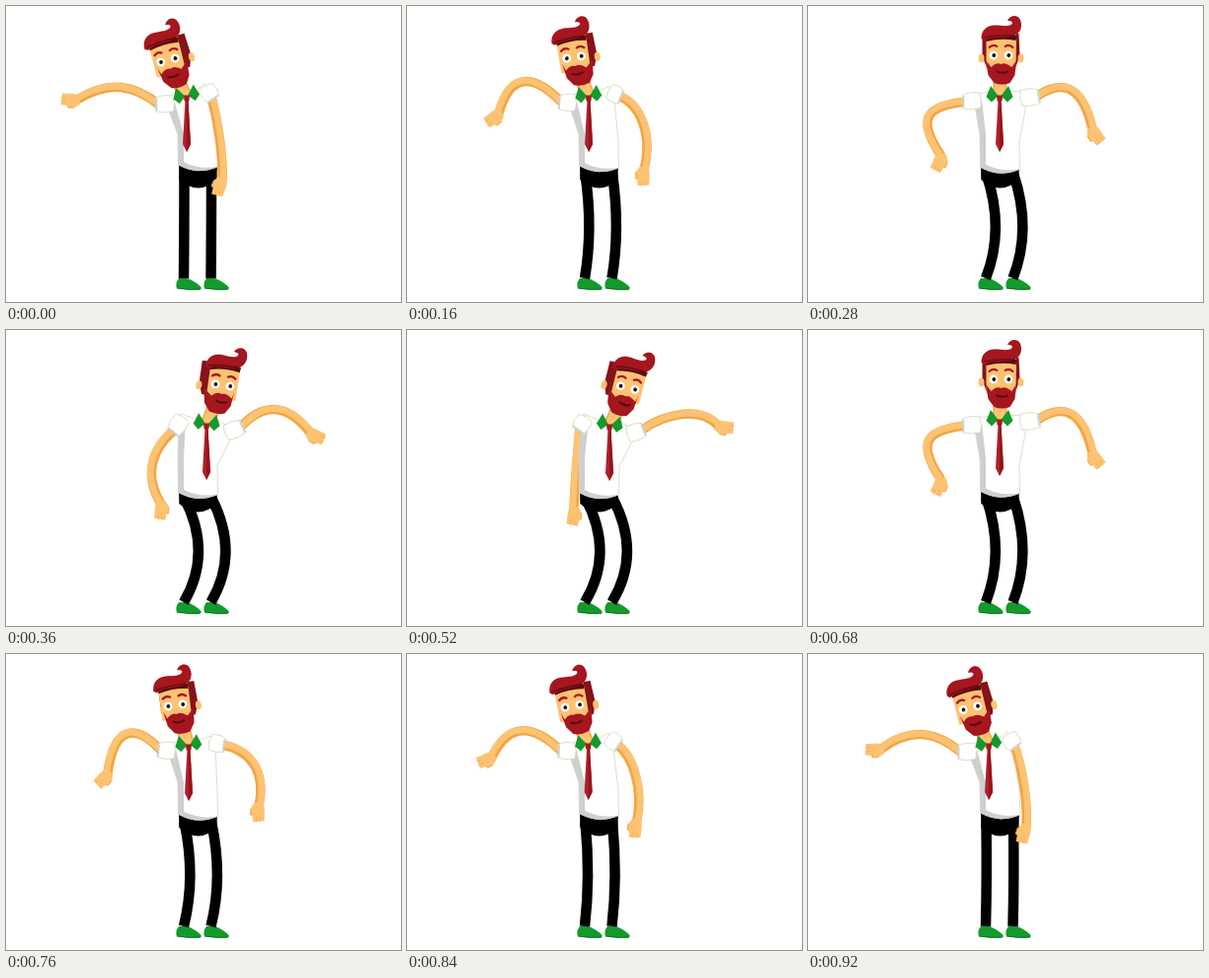
An HTML page for the animation above (960 ms loop, 400 by 300 pixels).

```html
<!DOCTYPE html>
<html lang="en">
<head>
<meta charset="utf-8">
<title>Dancing man</title>
<style>
html, body { margin: 0; width: 100%; height: 100%; overflow: hidden; background: #fff; }
svg { display: block; width: 100vw; height: 100vh; }
</style>
</head>
<body>
<svg id="stage" viewBox="0 0 400 300"></svg>
<script>
const LOOP = 960, HALF = LOOP / 2, STEP = 40;
const SKIN = '#fdc272', SHADE = '#f2a644', HAIR = '#a5161f', DARK = '#5c0a10';
const GREEN = '#149a2c', GREY = '#cfcfcf', EDGE = '#c6cba6';

// Poses of the swing from left to right; the way back mirrors them.
const keys = [0, 160, 200, 280, 360, 440, HALF];
const poses = {
  // x, y between the eyes, tilt, turn
  head: [[164, 55, -15, -1], [169, 52, -9, -.9], [171.5, 52, -8, -.8],
         [195.5, 50, 0, 0], [219.5, 56, 8, 1], [223.5, 58.5, 14, 1]],
  // tie knot x, y, knee bend
  body: [[183, 93, 0], [184, 93, 8], [185, 94, 12], [194, 93, 19], [203, 97, 29], [205, 98, 30]],
  // left shoulder, right shoulder
  shoulder: [[166, 99, 204, 85], [167, 98, 208, 88], [167, 98, 210, 90],
             [171, 96, 219, 93], [177, 92, 226, 103], [179, 92, 227, 105]],
  // cubic curve and hand angle
  armL: [[155, 100, 130, 80, 105, 75, 72, 95, 180], [157, 98, 130, 70, 105, 65, 93, 109, 140],
         [157, 98, 133, 72, 110, 70, 103, 121, 130], [160, 97, 122, 101, 108, 112, 135, 152, 110],
         [171, 101, 148, 120, 139, 147, 157, 176, 92], [175, 99, 173, 125, 170, 150, 169, 182, 94]],
  armR: [[208, 92, 214, 115, 220, 150, 219, 177, 112], [214, 91, 236, 99, 249, 130, 240, 166, 95],
         [218, 92, 244, 96, 264, 116, 256, 154, 93], [231, 92, 254, 76, 277, 76, 288, 125, 58],
         [237, 99, 257, 77, 281, 70, 308, 104, 30], [237, 102, 259, 86, 296, 76, 315, 97, 12]]
};
for (const rows of Object.values(poses)) {
  const [a, b] = rows.slice(-2);
  rows.push(b.map((v, i) => v + (v - a[i]) * .12));
}

function sample(rows, t) {
  let i = 0;
  while (i < keys.length - 2 && t > keys[i + 1]) i++;
  const span = keys[i + 1] - keys[i], u = (t - keys[i]) / span;
  const slope = (k, c) => k === 0 || k === keys.length - 1 ? 0 :
    (rows[k + 1][c] - rows[k - 1][c]) / (keys[k + 1] - keys[k - 1]) * span;
  return rows[i].map((a, c) => {
    const b = rows[i + 1][c], w = u * u * (3 - 2 * u);
    return a + (b - a) * w + slope(i, c) * u * (1 - u) ** 2 - slope(i + 1, c) * u * u * (1 - u);
  });
}

const path = (d, fill, extra = '') => `<path d="${d}" fill="${fill}" ${extra}/>`;
const line = (d, color, width, extra = '') =>
  `<path d="${d}" fill="none" stroke="${color}" stroke-width="${width}" ${extra}/>`;
const dot = (x, y, rx, ry, fill) => `<ellipse cx="${x}" cy="${y}" rx="${rx}" ry="${ry}" fill="${fill}"/>`;
const group = (x, y, turn, inner, flip = 1) =>
  `<g transform="translate(${x} ${y}) rotate(${turn}) scale(1 ${flip})">${inner}</g>`;
const outline = `stroke="${EDGE}" stroke-width=".6"`;

function arm([ax, ay, bx, by, cx, cy, x, y, turn], side) {
  const d = `M${ax},${ay}C${bx},${by} ${cx},${cy} ${x},${y}`;
  const hand = path('M-3,-4.5L4,-6L15,-6.5L16.5,5L10,6L9,8L3,8L-3,4.5Z', SKIN) +
    line('M3,8L9,8L10,6', SHADE, 1) + line('M11,-2.5L16,-2.5M11,1.5L16,1.5', SHADE, .6);
  return line(d, SHADE, 9.5) +
    line(d, SKIN, 6.6, `transform="translate(${side * 1.2} -.9)"`) +
    group(x, y, turn, hand, side);
}

function sleeve(sx, sy, [ax, ay], side) {
  const len = Math.hypot(ax - sx, ay - sy) + 3;
  const turn = Math.atan2(ay - sy, ax - sx) * 180 / Math.PI;
  const shape = path(`M-3,-8Q${len * .5},-10 ${len},-7L${len + 1},6.5Q${len * .5},9.5 -3,8Q-6,0 -3,-8Z`, '#fff', outline) +
    line(`M${len - 1},-6.5L${len},6`, GREY, 1.6);
  return group(sx, sy, turn, shape, side);
}

function legs(bend) {
  const leg = x => line(`M${x},170Q${x + bend},226 ${x - .5},276`, '#000', 10.5);
  const shoe = x => path(`M${x - 5},276Q${x - 9},281 ${x - 7},286Q${x + 5},288.5 ${x + 16},287.5Q${x + 20},286 ${x + 15},282.5Q${x + 8},277 ${x + 3},276Z`, GREEN) +
    line(`M${x - 7},286Q${x + 5},288 ${x + 17},287`, '#0c7420', 1);
  return shoe(180) + shoe(208) + leg(180.5) + leg(208) +
    path('M175,158L214,160L213.3,176Q195,193 175.3,176Z', '#000');
}

function torso(lx, ly, rx, ry, kx, ky, bend) {
  const y = 161 + bend * .13, mid = 130;
  // The slack side folds in towards the waist.
  const foldL = Math.min(174, lx + 10), foldR = Math.max(214, rx - 12);
  const left = `M${lx - 2},${ly + 5}L${foldL},${mid}L174.5,${y}`;
  return path(`${left}Q194,${y + 11} 214.5,${y + 2}L${foldR},${mid + 8}L${rx + 2},${ry + 6}L${rx - 3},${ry - 7}L${kx + 9},${ky - 6}L${kx - 9},${ky - 6}L${lx},${ly - 7}Z`, '#fff', outline) +
    path(`${left}Q194,${y + 11} 214.5,${y + 2}Q194,${y + 5} 180,${y - 3}L${foldL + 6},${mid}L${lx + 5},${ly - 1}Z`, GREY);
}

function collar(kx, ky, tilt) {
  const flap = s => path(`M${9 * s},-12L${13.5 * s},-1L${8 * s},4.5L${1.5 * s},-2Z`, GREEN);
  const tie = path('M-1.5,3L1.5,3L4,47L0,55L-4,47Z', '#b01f27') +
    path('M0,3L1.5,3L4,47L0,55Z', '#94151d') +
    path('M-3,-2.5L3,-2.5L2.5,3L0,5L-2.5,3Z', '#a51820');
  return group(kx, ky, tilt * .7, flap(-1) + flap(1)) + group(kx, ky, 0, tie);
}

function head(x, y, tilt, turn) {
  const back = -5 * turn;
  const ear = s => dot(s * 20 - turn * (s * turn > 0 ? 9 : 4), 3, 3, 4.5, SKIN);
  const eye = s => dot(s * 7.5, 0, 4.4, 4.4, '#fff') + dot(s * 7.5 + .3, 0, 1.9, 2, '#111');
  const brow = s => line(`M${s * 3.5},-8.5Q${s * 8},-12 ${s * 12.5},-7.5`, HAIR, 2.2);
  const chin = -3 * turn;
  return group(x, y, tilt,
    path(`M${back - 19},-22L${back - 19},0L${back - 15},12L${back + 15},12L${back + 19},0L${back + 18},-22Z`, '#86121a') +
    ear(-1) + ear(1) +
    path('M-15,-22L15.5,-22L15,14L-15,14Z', SKIN) +
    path('M-16,-20L16,-20L15,-15Q0,-18 -15,-14Z', DARK) +
    path(`M${back * .6 - 15.5},5L${chin - 13},20L${chin - 7},28Q${chin + 1},31 ${chin + 9},28L${chin + 14},20L${back * .6 + 15.5},5L11,12L7,9.5Q3,7.5 0,9Q-3,7.5 -7,9.5L-10,12Z`, HAIR) +
    line('M-5,16Q1,19.5 7,16', DARK, 2) +
    eye(-1) + eye(1) + brow(-1) + brow(1) +
    path('M-20,-17C-20,-25 -15,-30 -8,-30.5C-1,-31 5,-28.5 10,-31C13,-33 11,-35 6.5,-35C9,-41 17,-42 19.5,-36C22,-30 20,-23 14,-20C4,-17 -9,-20 -17,-15Z', HAIR) +
    line('M-17,-18Q-2,-21 14,-20', DARK, 1.2));
}

const stage = document.getElementById('stage');

function draw(time) {
  const t = time <= HALF ? time : LOOP - time;
  const [hx, hy, tilt, turn] = sample(poses.head, t);
  const [kx, ky, bend] = sample(poses.body, t);
  const [lx, ly, rx, ry] = sample(poses.shoulder, t);
  const left = sample(poses.armL, t), right = sample(poses.armR, t);
  const neck = `M${kx},${ky}L${hx + (kx - hx) * .45},${hy + 18}`;
  stage.innerHTML = legs(bend) + arm(left, -1) +
    torso(lx, ly, rx, ry, kx, ky, bend) + arm(right, 1) +
    sleeve(lx, ly, left, -1) + sleeve(rx, ry, right, 1) +
    line(neck, SHADE, 14) + line(neck, SKIN, 11) +
    collar(kx, ky, tilt) + head(hx, hy, tilt, turn);
}

let shown = -1;
function tick() {
  const time = Math.floor(performance.now() % LOOP / STEP) * STEP;
  if (time !== shown) draw(shown = time);
  requestAnimationFrame(tick);
}
tick();
</script>
</body>
</html>
```
